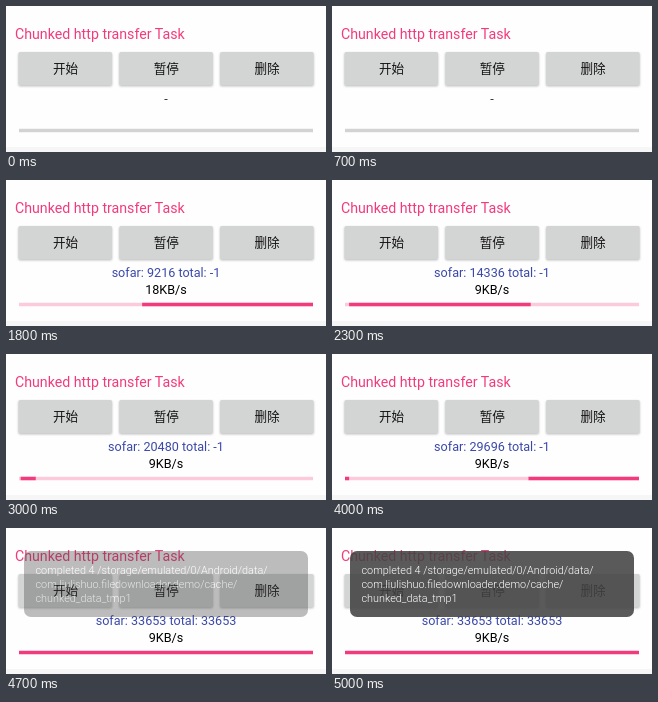
Recreate the animation shown at these times as an HTML page. Size 320 px wide and 146 px high, loop 6.6 s.

```html
<!DOCTYPE html>
<html lang="zh">
<head>
<meta charset="utf-8">
<title>Chunked http transfer Task</title>
<style>
  html, body { margin: 0; width: 100%; height: 100%; overflow: hidden; background: #fefefe; }
  svg { display: block; width: 100vw; height: 100vh; }
  text { font: 12.6px Roboto, sans-serif; }
  .mid { text-anchor: middle; }
  .title { font-size: 14.2px; fill: #f23b7c; }
  .btn rect { fill: #d3d5d4; filter: drop-shadow(0 1px 1px #0004); }
  .btn text { font: 500 12.6px "Noto Sans CJK SC", "Noto Sans CJK", sans-serif; fill: #111; }
  .bar { fill: #f23b7c; }
  #toast text { font-size: 10.85px; font-weight: 300; fill: #fff; }
</style>
</head>
<body>
<svg viewBox="0 0 320 146">
  <defs><clipPath id="trackClip"><rect x="13" y="122.7" width="294" height="3.6"/></clipPath></defs>
  <rect y="141" width="320" height="5" fill="#f6f6f6"/>
  <text class="title" x="9" y="32.5">Chunked http transfer Task</text>
  <g id="buttons"></g>
  <text id="detail" class="mid" x="160" y="97"></text>
  <text id="speed" class="mid" x="160" y="114"></text>
  <g clip-path="url(#trackClip)">
    <rect id="track" x="13" y="122" width="294" height="5"/>
    <rect id="first" class="bar" y="122" height="5"/>
    <rect id="second" class="bar" y="122" height="5"/>
  </g>
  <g id="toast">
    <rect x="18" y="23" width="284" height="66" rx="7" fill="#424242" fill-opacity=".87"/>
    <text x="29.5" y="45.5">completed 4 /storage/emulated/0/Android/data/</text>
    <text x="29.5" y="59.7">com.liulishuo.filedownloader.demo/cache/</text>
    <text x="29.5" y="73.9">chunked_data_tmp1</text>
  </g>
</svg>
<script>
const LOOP = 6600, STEP = 100, START = 1000, DONE = 4500, CYCLE = 2000;
const TOTAL = 33653, CHUNK = 1024;
const TRACK_X = 13, TRACK_W = 294;
const el = id => document.getElementById(id);
const clamp = x => Math.min(1, Math.max(0, x));

el('buttons').innerHTML = ['开始', '暂停', '删除'].map((label, i) =>
  `<g class="btn" transform="translate(${12.5 + i * 100.8} 46)">
     <rect width="93.5" height="33.3" rx="1.5"/>
     <text class="mid" x="47" y="21">${label}</text>
   </g>`).join('');

const easeIn = (x, power) => clamp(x) ** power;
const easeOut = (x, power) => 1 - (1 - clamp(x)) ** power;

function setBar(id, left, right) {
  el(id).setAttribute('x', TRACK_X + left * TRACK_W);
  el(id).setAttribute('width', Math.max(0, right - left) * TRACK_W);
}

// Two bars sweep the track per cycle: one speeds up, the next slows down.
function drawSweeps(p) {
  setBar('first', easeIn(p / .7, 2), easeIn(p / .41, 1.4));
  setBar('second', easeOut((p - .7) / .3, 1.4), easeOut((p - .55) / .3, 1.4));
}

function draw(t) {
  const started = t >= START, done = t >= DONE;

  const chunks = Math.floor(2.35 + 9 * (t - START) / 1000);
  el('detail').textContent = !started ? '-'
    : done ? `sofar: ${TOTAL} total: ${TOTAL}` : `sofar: ${chunks * CHUNK} total: -1`;
  el('detail').setAttribute('fill', started ? '#3a49a9' : '#333');
  el('speed').textContent = !started ? '' : t < 2000 ? '18KB/s' : '9KB/s';

  el('track').setAttribute('fill', !started ? '#d3d3d3' : done ? '#f23b7c' : '#fbcbdb');
  drawSweeps(started && !done ? (t - START + 106) / CYCLE % 1 : 0);
  el('toast').setAttribute('opacity', clamp((t - DONE) / 500));
}

const begin = performance.now();
function tick() {
  const t = (performance.now() - begin) % LOOP;
  draw(Math.floor(t / STEP) * STEP);
  requestAnimationFrame(tick);
}
tick();
</script>
</body>
</html>
```
